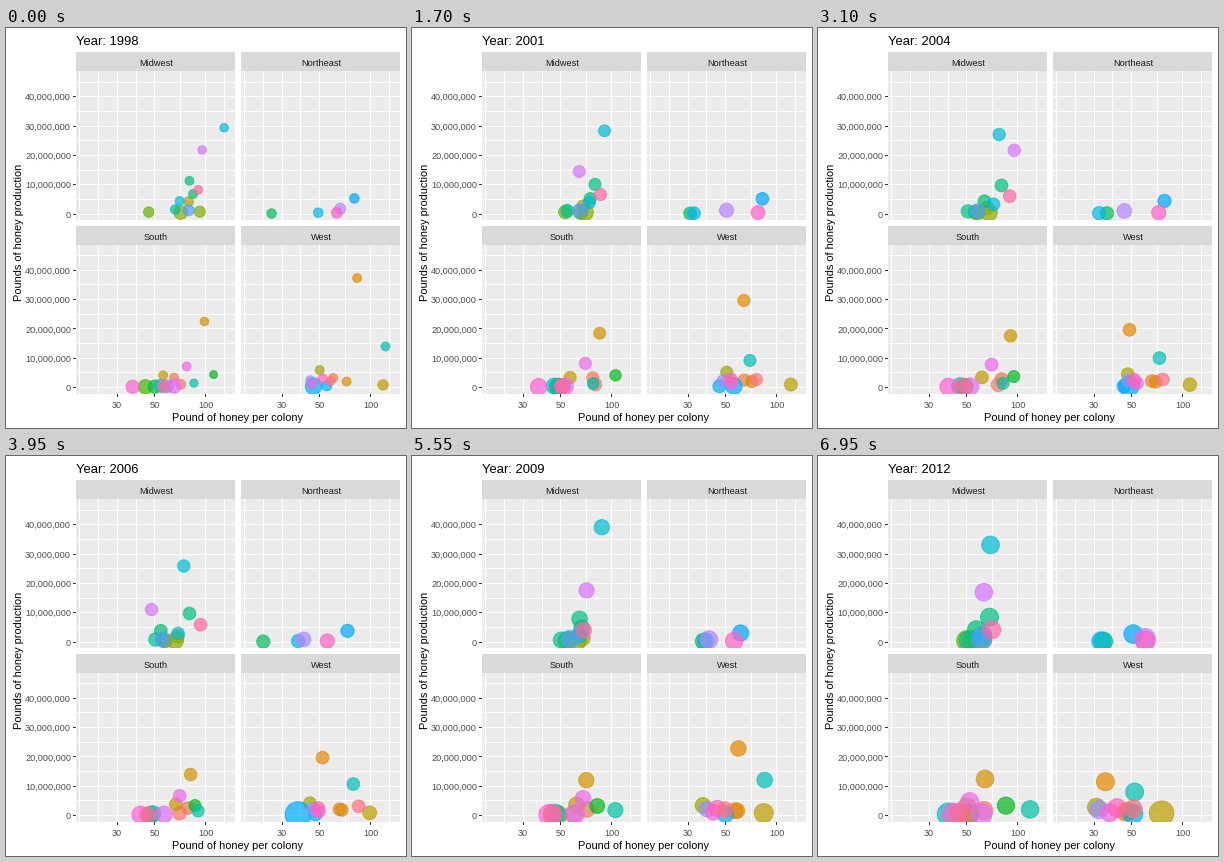
Animation of 400x400 px, one loop 7 s. Source, as a matplotlib script:

```python
import numpy as np
import matplotlib.pyplot as plt
from matplotlib.animation import FuncAnimation
from matplotlib.patches import Circle, Rectangle

plt.rcParams["font.family"] = "Liberation Sans"

SIZE, DPI, FRAMES = 400, 100, 140
PX = 72 / DPI  # points per pixel
START, END = 1998, 2012
US_PRICE = [.655, .6, .6, .7, 1.33, 1.39, 1.08, .92, 1.04, 1.08, 1.42, 1.47, 1.62, 1.77, 1.99]

CODES = ("AL AR AZ CA CO FL GA HI IA ID IL IN KS KY LA MD ME MI MN MO MS MT "
         "NC ND NE NJ NM NV NY OH OK OR PA SC SD TN TX UT VA VT WA WI WV WY").split()

# Panel geometry in pixels, y pointing down
W, H, STRIP = 159.5, 149.6, 18.5
PANELS = {"Midwest": (70.3, 43.1), "Northeast": (235.2, 43.1),
          "South": (70.3, 216.6), "West": (235.2, 216.6)}


def padded(lo, hi):
    pad = .05 * (hi - lo)
    return lo - pad, hi + pad


X0, X1 = padded(np.log10(19), np.log10(136))
Y0, Y1 = padded(.084, 46.41)


def px(panel, logx):
    return PANELS[panel][0] + W * (logx - X0) / (X1 - X0)


def py(panel, y):
    return PANELS[panel][1] + H * (Y1 - y) / (Y1 - Y0)


def hcl(h, c=100, l=65):
    """Polar LUV colour to sRGB."""
    h = np.radians(h)
    y = ((l + 16) / 116) ** 3
    u = c * np.cos(h) / (13 * l) + .1978398
    v = c * np.sin(h) / (13 * l) + .4683363
    x = 9 * y * u / (4 * v)
    z = -x / 3 - 5 * y + 3 * y / v
    m = np.array([[3.240479, -1.537150, -.498535],
                  [-.969256, 1.875992, .041556],
                  [.055648, -.204043, 1.057311]])
    rgb = np.clip(m @ [x, y, z], 0, 1)
    return np.where(rgb > .00304, 1.055 * rgb ** (1 / 2.4) - .055, 12.92 * rgb)


def track(values, t, end=END):
    """Linear path through key values spread evenly over the years."""
    values = np.atleast_1d(values)
    return np.interp(t, np.linspace(START, end, len(values)), values)


def radius(price):
    size = 2 + 10 * np.sqrt(np.clip((price - .49) / 3.66, 0, 1))
    return .375 * (size * 2.845 + .945)


class State:
    """Key values: pounds per colony, thousand colonies, price against the US mean."""

    def __init__(self, code, panel, yields, colonies, premium=.93, end=END):
        self.rank = CODES.index(code)
        self.panel, self.end = panel, end
        self.logx, self.colonies, self.premium = np.log10(yields), colonies, premium
        self.color = (*hcl(15 + 360 * self.rank / len(CODES)), .7)

    def place(self, t):
        logx = track(self.logx, t, self.end)
        output = track(self.colonies, t, self.end) * 10 ** logx / 1000
        price = track(US_PRICE, t) * track(self.premium, t, self.end)
        self.dot.center = px(self.panel, logx), py(self.panel, output)
        self.dot.radius = radius(price)
        self.dot.set_visible(t <= self.end)


M, N, S, P = PANELS
states = [
    State("IA", M, [79, 64, 70, 62], [54, 35, 25, 15], 1),
    State("IL", M, [71, 69, 65, 58], 8, [1.7, 1.25]),
    State("IN", M, [92, 58, 57, 50], 9, 1.2),
    State("KS", M, [46, 56, 56, 54], [15, 10], 1.1),
    State("MI", M, [84, 71, 76, 65, 54, 73, 62, 57], [82, 67, 73, 74]),
    State("MN", M, [80, 89, 76, 80, 80, 77, 57, 68], [142, 122, 122, 125]),
    State("MO", M, [66, 51, 50, 51], [24, 12], 1),
    State("ND", M, [128, 115, 82, 78, 74, 92, 84, 69],
          [230, 300, 320, 350, 350, 390, 490, 480], .9),
    State("NE", M, [70, 75, 66, 62], [64, 50, 40, 36]),
    State("OH", M, [79, 60, 54, 61], 17, 1.2),
    State("SD", M, [95, 119, 50, 105, 47, 90, 60, 63], [230, 225, 235, 270], .9),
    State("WI", M, [90, 87, 85, 89, 93, 80, 61, 70], [92, 73, 60, 60]),

    State("ME", N, [26, 21, 36, 38, 23, 40, 35, 34], 8, 1),
    State("NJ", N, [49, 28, 42, 33], 10, 1),
    State("NY", N, [80, 83, 69, 51], [67, 62, 49, 54], 1),
    State("PA", N, [66, 45, 53, 46, 40, 48, 35, 60], [28, 20], 1.2),
    State("VT", N, [63, 60, 86, 75, 55, 66, 50, 60], 7, 1.15),

    State("AL", S, [71, 83, 65, 52], [16, 9], 1.05),
    State("AR", S, [65, 82, 77, 63], [53, 40, 30, 28]),
    State("FL", S, [98, 104, 78, 92, 81, 78, 66, 64], [230, 215, 155, 195], .9),
    State("GA", S, [56, 57, 71, 50], [75, 56, 59, 60]),
    State("KY", S, [44, 50, 46, 51], 7, [1.8, 1.2]),
    State("LA", S, [111, 103, 80, 85], 40, .85),
    State("MD", S, [50, 51, 43], 7, 1.6, end=2003),
    State("MS", S, [85, 75, 97, 118], 18, .88),
    State("NC", S, [54, 43, 51, 39], 12, 1.5),
    State("OK", S, [59, 35, 98], 8, 1.5, end=2003),
    State("TN", S, [65, 49, 60, 61], 8, [1.8, 1.3]),
    State("TX", S, [77, 80, 66, 70, 70, 67, 68, 52], [94, 127, 84, 92]),
    State("VA", S, [37, 37, 43, 42], 8, 1.6),
    State("WV", S, [56, 49, 44, 46], 8, 1.4),

    State("AZ", P, [60, 66, 65, 46], [55, 35, 32, 27]),
    State("CA", P, [83, 69, 62, 48, 52, 51, 66, 35],
          [450, 450, 470, 410, 380, 350, 410, 330]),
    State("CO", P, [72, 71, 66, 48], 29),
    State("HI", P, [118, 122, 90, 75], [8, 11], [1.1, 1, 1.1, 1.8]),
    State("ID", P, [50, 51, 41, 31], [120, 97, 97, 92]),
    State("MT", P, [122, 92, 62, 72, 79, 70, 97, 52], [115, 140, 135, 155]),
    State("NM", P, [55, 43, 49, 51], 11, 1.05),
    State("NV", P, [46, 37, 66, 50, 37, 28], 10, [2.4, 2.7, 1.2, 2, 3.9, 1.05], end=2008),
    State("OR", P, [44, 50, 44, 32], [58, 45, 53, 64]),
    State("UT", P, [45, 58, 46, 37], 28),
    State("WA", P, [52, 54, 47, 41], [58, 52, 50, 64], 1),
    State("WY", P, [58, 92, 70, 75, 85, 63, 42, 51], [39, 35, 39, 45]),
]

fig = plt.figure(figsize=(SIZE / DPI, SIZE / DPI), dpi=DPI, facecolor="white")
ax = fig.add_axes([0, 0, 1, 1])
ax.set(xlim=(0, SIZE), ylim=(SIZE, 0))
ax.axis("off")


def box(x, y, w, h, color):
    return ax.add_patch(Rectangle((x, y), w, h, fc=color, lw=0, antialiased=False))


def label(x, y, s, size=9.2, color="#4D4D4D", **kw):
    return ax.text(x, y, s, fontsize=size * PX, color=color, **kw)


X_MAJOR = np.log10([30, 50, 100])
STEP = X_MAJOR[1] - X_MAJOR[0]
X_MINOR = [X_MAJOR[0] - STEP, X_MAJOR[0] - STEP / 2, X_MAJOR[:2].mean(),
           X_MAJOR[1:].mean(), X_MAJOR[2] + STEP / 2]

clips = {}
for name, (left, top) in PANELS.items():
    x0, y0, w, h = round(left), round(top), int(W), int(H)
    strip_top = int(top - STRIP)
    box(x0, strip_top, w, y0 - strip_top, "#D9D9D9")
    label(left + W / 2, top - 4.6, name, color="#1A1A1A", ha="center")
    clips[name] = box(x0, y0, w, h, "#EBEBEB")
    for y in range(0, 50, 5):
        box(x0, int(py(name, y)), w, 1, "white")
    for x in [*X_MINOR, *X_MAJOR]:
        box(int(px(name, x)), y0, 1, h, "white")
    if left < 100:
        for y in range(0, 50, 10):
            box(67, int(py(name, y)), 3, 1, "#333333")
            label(65, py(name, y) + 3.4, f"{y * 10**6:,}", ha="right")
    if top > 200:
        for x in X_MAJOR:
            box(int(px(name, x)), 366, 1, 3, "#333333")
            label(px(name, x), 380, f"{10**x:.0f}", ha="center")

label(232, 392.7, "Pound of honey per colony", 11, "black", ha="center")
label(12.6, 204.5, "Pounds of honey production", 11, "black",
      ha="center", va="center", rotation=90)
title = label(70, 17.3, "", 13, "black")

for s in states:
    s.dot = ax.add_patch(Circle((0, 0), 1, fc=s.color, ec=s.color, lw=PX,
                                zorder=3 + s.rank / 100))
    s.dot.set_clip_path(clips[s.panel])


def draw(i):
    t = START + (END - START) * i / (FRAMES - 1)
    title.set_text(f"Year: {round(t)}")
    for s in states:
        s.place(t)
    return [title, *(s.dot for s in states)]


anim = FuncAnimation(fig, draw, frames=FRAMES, interval=50, repeat=True, repeat_delay=0)
plt.show()
```
